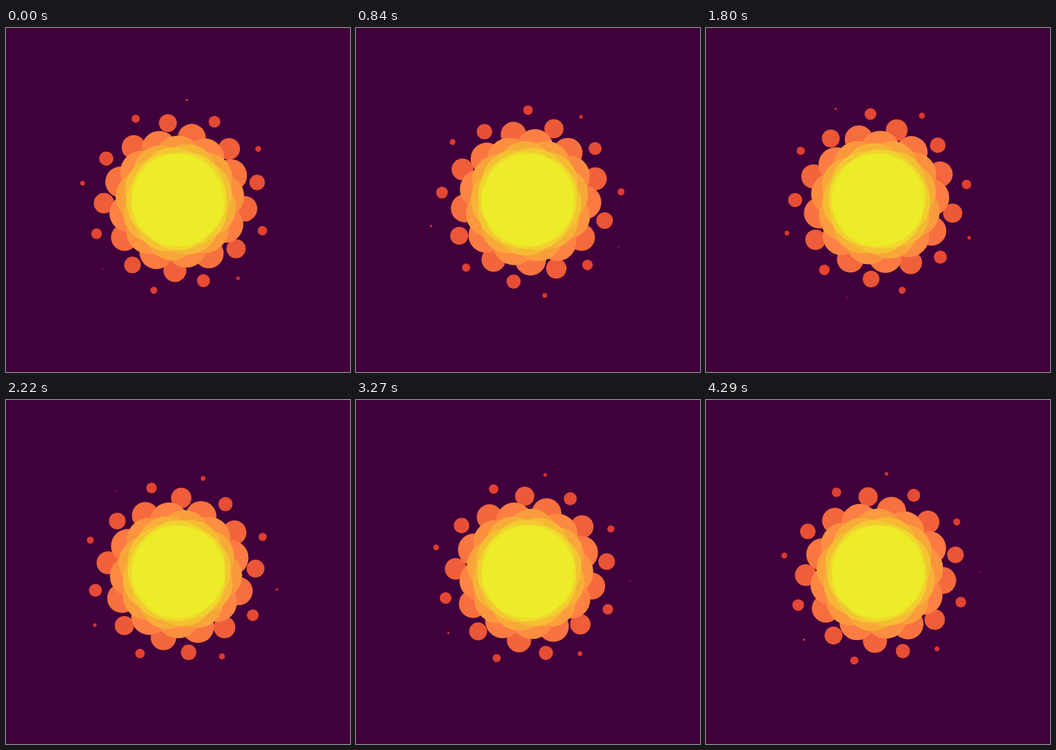
An HTML page for the animation above (4.32 s loop, 500 px wide and 500 px high).

```html
<!DOCTYPE html>
<html lang="en">
<head>
<meta charset="utf-8">
<title>Sunburst</title>
<style>
  html, body { margin: 0; width: 100%; height: 100%; overflow: hidden; background: #40003c; }
  svg { display: block; width: 100%; height: 100%; }
</style>
</head>
<body>
<svg id="stage" viewBox="0 0 500 500"></svg>
<script>
const STEP_MS = 30;
const LOOP_STEPS = 144;
const LIFE = 59;            // steps from birth at the core to vanishing
const GOLDEN_ANGLE = 137.5; // degrees between successive bubbles
const RED = [214, 42, 42], ORANGE = [255, 128, 68], YELLOW = [237, 236, 40];

const stage = document.getElementById("stage");

const mix = (a, b, t) => a.map((v, i) => Math.round(v + (b[i] - v) * t));

function colorAt(left) {
  const t = left / LIFE * 2;
  const rgb = t < 1 ? mix(RED, ORANGE, t) : mix(ORANGE, YELLOW, t - 1);
  return `rgb(${rgb})`;
}

const distanceAt = left => Math.max(0, 151 - 2.55 * left);
const radiusAt = left => 0.85 * left + 8e-5 * left ** 3;

// Oldest bubbles first, so the youngest is painted on top.
const bubbles = Array.from({ length: LIFE }, (_, i) => {
  const left = i + 1;
  const node = document.createElementNS("http://www.w3.org/2000/svg", "circle");
  node.setAttribute("r", radiusAt(left));
  node.setAttribute("fill", colorAt(left));
  stage.append(node);
  return { node, left, distance: distanceAt(left) };
});

function render(ms) {
  const step = Math.floor(ms / STEP_MS) % LOOP_STEPS;
  for (const { node, left, distance } of bubbles) {
    const angle = (step + left) * GOLDEN_ANGLE * Math.PI / 180;
    node.setAttribute("cx", 250 + distance * Math.cos(angle));
    node.setAttribute("cy", 250 + distance * Math.sin(angle));
  }
}

const start = performance.now();
function tick() {
  render(performance.now() - start);
  requestAnimationFrame(tick);
}
tick();
</script>
</body>
</html>
```
